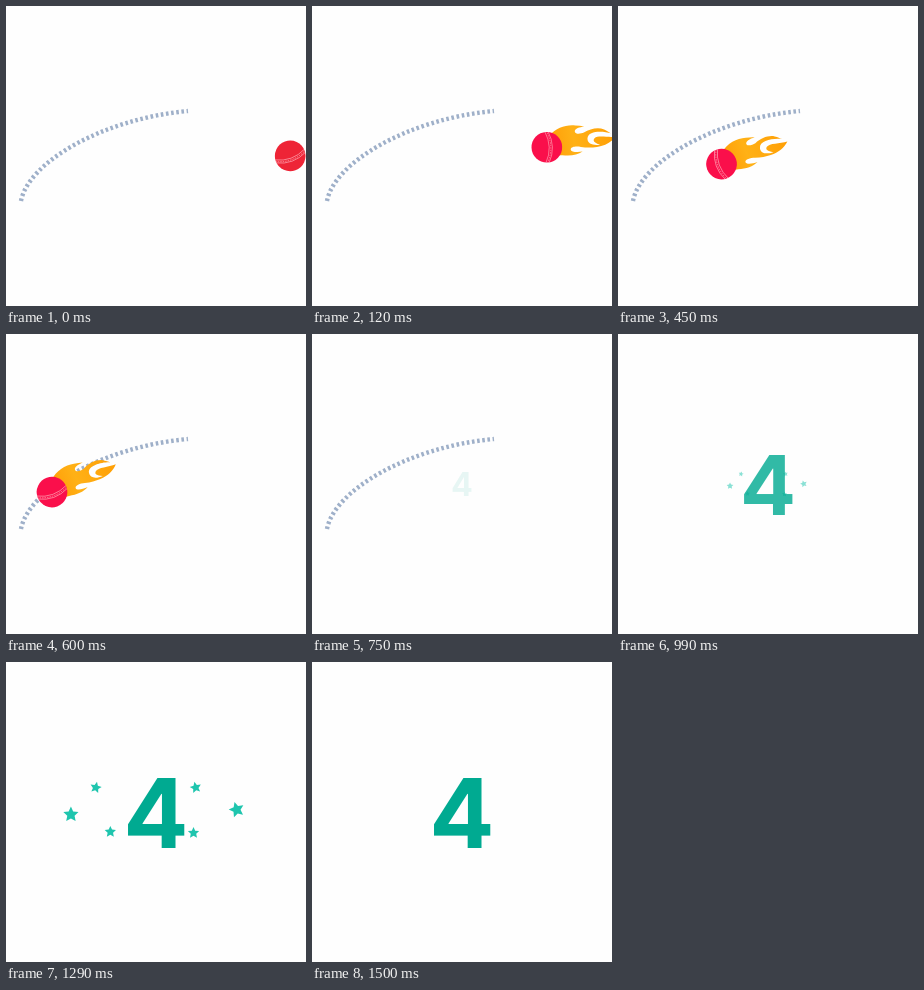
Animation, 300 px wide and 300 px high, one loop 1530 ms. Source, as an HTML page with a canvas:

```html
<!DOCTYPE html>
<html lang="en">
<head>
<meta charset="utf-8">
<title>Boundary four</title>
<style>
  html, body { margin: 0; width: 100%; height: 100%; overflow: hidden; background: #fefefe; }
  canvas { display: block; width: 100vw; height: 100vh; }
</style>
</head>
<body>
<canvas width="300" height="300" aria-label="4"></canvas>
<script>
const LOOP = 1530, STEP = 30;
const canvas = document.querySelector('canvas');
const ctx = canvas.getContext('2d');
const ratio = window.devicePixelRatio || 1;
canvas.width = canvas.height = 300 * ratio;

const ramp = (t, from, to) => Math.min(1, Math.max(0, (t - from) / (to - from)));
const mix = (a, b, k) => a + (b - a) * k;
const rad = deg => deg * Math.PI / 180;

const rope = new Path2D('M15 195C22 157 95 113 182 105');
const seam = new Path2D('M-16 -1.6Q0 6.4 16 -1.6M-16 1.6Q0 9.6 16 1.6');
const stitches = new Path2D('M-16 0Q0 8 16 0');
// Flame relative to the ball's centre, pointing right.
const flame = new Path2D(
  'M2 -12C8 -20 18 -24 27 -23.5C30 -23.5 33 -23.5 36 -23C31 -22 26 -20 27 -17C28 -14.5 33 -15.5 36 -17' +
  'C42 -21.5 50 -23.5 56 -21.5C59 -20.5 61 -19 63 -18C55 -20 40 -19.5 40 -11.5C40 -6 46 -4.5 53 -6' +
  'C47 -7.5 45 -9.5 47 -12C50 -15.5 60 -13.5 68 -15C64 -9 58 -5 50 -3.5C45 -2.5 40 -2 34 -2.5' +
  'C29 -3 24 -2 24 0.5C24 3 30 3.5 36 2C31 6 24 7.5 16 7L4 8Z');

// [speed x, speed y, growth of radius, tilt]; speeds in px per ms from the centre
const stars = [
  [-0.157, 0.002, 0.0148, 0], [0.150, -0.007, 0.0148, -16],
  [-0.111, -0.048, 0.011, 12], [0.074, -0.048, 0.011, -12],
  [-0.084, 0.034, 0.011, 0], [0.070, 0.036, 0.011, 0]
];

function placed(x, y, angle, alpha, draw) {
  ctx.save();
  ctx.translate(x, y);
  ctx.rotate(rad(angle));
  ctx.globalAlpha = alpha;
  draw();
  ctx.restore();
}

function drawRope(t) {
  placed(0, 0, 0, 1 - ramp(t, 750, 930), () => {
    ctx.strokeStyle = '#9fb0c9';
    ctx.lineWidth = 4.4;
    ctx.setLineDash([2.6, 2.6]);
    ctx.stroke(rope);
  });
}

function drawBall(t) {
  const x = 284.2 - 0.415 * t + 0.00003 * t * t;
  const y = 139.8 + 0.000275 * (Math.min(t, 450) - 192) ** 2;
  const alpha = 1 - ramp(t, 660, 750);
  const heat = ramp(t, 0, 120);

  placed(x, y, -0.031 * (t - 240), alpha * heat, () => {
    const glow = ctx.createLinearGradient(5, 0, 68, -15);
    glow.addColorStop(0, '#ff9f08');
    glow.addColorStop(0.35, '#ffb116');
    glow.addColorStop(1, '#ff9f05');
    ctx.fillStyle = glow;
    ctx.fill(flame);
  });
  placed(x, y, -20 - 0.6 * t, alpha, () => {
    ctx.beginPath();
    ctx.arc(0, 0, 15.3, 0, 2 * Math.PI);
    ctx.fillStyle = `rgb(${mix(238, 250, heat)},${mix(36, 15, heat)},${mix(54, 75, heat)})`;
    ctx.fill();
    ctx.clip();
    ctx.strokeStyle = '#ffb3bf';
    ctx.lineWidth = 0.6;
    ctx.stroke(seam);
    ctx.setLineDash([1.5, 1]);
    ctx.stroke(stitches);
  });
}

function drawStars(t) {
  const age = t - 750;
  const alpha = ramp(t, 750, 1210) * (1 - ramp(t, 1400, 1500));
  for (const [vx, vy, growth, tilt] of stars) {
    placed(149.7 + vx * age, 151.5 + vy * age, tilt, alpha, () => {
      ctx.beginPath();
      for (let i = 0; i < 10; i++) {
        const r = growth * age * (i % 2 ? 0.48 : 1);
        const a = rad(36 * i - 90);
        ctx.lineTo(r * Math.cos(a), r * Math.sin(a));
      }
      ctx.fillStyle = '#1fc5ae';
      ctx.fill();
    });
  }
}

function drawFour(t) {
  const grow = ramp(t, 720, 1055);
  const height = mix(19, 70.3, grow);
  placed(150, 150.7 + height / 2, 0, grow, () => {
    ctx.font = `700 ${height / 0.727}px Inter, sans-serif`;
    ctx.textAlign = 'center';
    ctx.fillStyle = '#00aa91';
    ctx.fillText('4', 0, 0);
  });
}

function frame(now) {
  const t = Math.floor(now % LOOP / STEP) * STEP;
  ctx.setTransform(ratio, 0, 0, ratio, 0, 0);
  ctx.fillStyle = '#fefefe';
  ctx.fillRect(0, 0, 300, 300);
  drawRope(t);
  if (t < 750) drawBall(t);
  if (t > 750) drawStars(t);
  if (t > 720) drawFour(t);
}

const start = performance.now();
function tick() {
  frame(performance.now() - start);
  requestAnimationFrame(tick);
}
tick();
</script>
</body>
</html>
```
